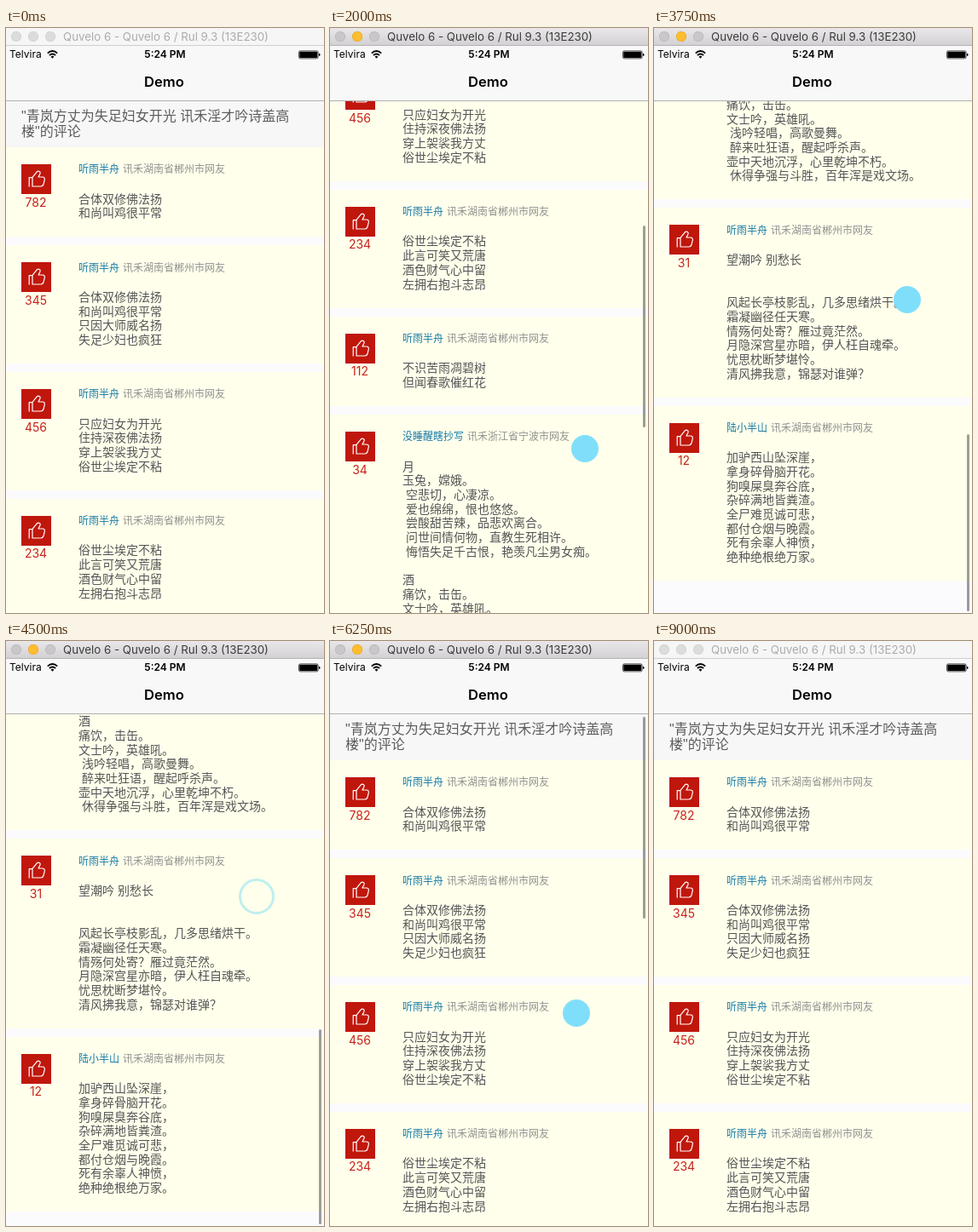
An HTML page that plays this animation: 373x687 px, repeating every 9500 ms.

```html
<!DOCTYPE html>
<html lang="zh-CN">
<head>
<meta charset="utf-8">
<title>Demo</title>
<style>
  html, body { margin: 0; width: 100%; height: 100%; overflow: hidden; background: #fbfbfd; }
  #stage { position: relative; width: 373px; height: 687px; overflow: hidden; background: #fbfbfd;
    font-family: "Liberation Sans", "Noto Sans CJK SC", "Noto Sans CJK", sans-serif; }
  #stage div, #stage svg { position: absolute; }
  #list { left: 0; top: 0; width: 373px; will-change: transform; }
  .head { top: 86px; width: 373px; height: 54px; background: #f7f7f7; }
  .head div { left: 18px; top: 8.8px; font-size: 16px; line-height: 18.5px; color: #5c5c5c; white-space: pre; }
  .card { width: 373px; background: #ffffeb; }
  .like { left: 18px; top: 20px; width: 35px; height: 35px; background: #c0170c; }
  .count { left: 0; top: 56.6px; width: 70px; text-align: center; color: #c8221a;
    font: 14px/16px Inter, sans-serif; }
  .who { left: 85px; top: 18.2px; font-size: 12px; line-height: 16px; white-space: nowrap; color: #929290; }
  .who b { font-weight: 400; color: #1478a6; margin-right: 4px; }
  .text { left: 85px; top: 52.6px; font-size: 14px; line-height: 16.7px; white-space: pre; color: #555; }
  #bar { left: 367px; width: 3px; border-radius: 2px; background: rgba(0, 0, 0, .38); }
  #touch { box-sizing: border-box; border-radius: 50%; }
  #nav { left: 0; top: 21px; width: 373px; height: 64px; background: #f8f8f8; border-bottom: 1px solid #b0b0ae;
    font-family: Inter, sans-serif; color: #000; }
  #nav div { white-space: nowrap; line-height: 16px; }
  #win { left: 0; top: 0; width: 373px; height: 20px; background: #f6f6f6; border-bottom: 1px solid #cfcfcf;
    color: #aeaaae; }
  #win.on { background: linear-gradient(#e9e7e9, #d3d1d3); border-color: #b4b2b4; color: #3c3c3c; }
  #win i { position: absolute; top: 4px; width: 12px; height: 12px; border-radius: 50%; background: #dcdcdc;
    box-shadow: inset 0 0 0 .5px #cacaca; }
  #win.on i { background: #c9c7c9; box-shadow: inset 0 0 0 .5px #b3b1b3; }
  #win.on i.min { background: #fdbd2f; box-shadow: inset 0 0 0 .5px #dfa023; }
  #win div { left: 67px; top: 2px; font: 13.3px/16px Inter, sans-serif; white-space: nowrap; }
</style>
</head>
<body>
<div id="stage">
  <div id="list"><div class="head"><div>"青岚方丈为失足妇女开光 讯禾淫才吟诗盖高
楼"的评论</div></div></div>
  <div id="bar"></div>
  <div id="nav">
    <div style="left:4px;top:2px;font-size:12px">Telvira</div>
    <svg style="left:48px;top:5px" width="13" height="10" fill="none" stroke="#000" stroke-width="1.9">
      <path d="M.8 3.6Q6.5-1.4 12.2 3.6M2.9 6Q6.5 2.9 10.1 6"/>
      <path d="M4.6 7.7Q6.5 6 8.4 7.7L6.5 9.8Z" fill="#000" stroke="none"/>
    </svg>
    <div style="left:0;width:373px;top:2px;text-align:center;font-size:12px;font-weight:600">5:24 PM</div>
    <svg style="left:343px;top:5px" width="27" height="11">
      <rect x=".5" y=".9" width="22.6" height="9" rx="1.6" fill="none" stroke="#000" stroke-width=".7"/>
      <rect x="1.3" y="1.7" width="21" height="7.4" rx=".8"/>
      <path d="M24 3.8q1.6.3 1.6 1.6t-1.6 1.6z"/>
    </svg>
    <div style="left:0;width:371px;top:34px;text-align:center;font-size:16.6px;font-weight:600">Demo</div>
  </div>
  <div id="win">
    <i style="left:6px"></i><i class="min" style="left:26px"></i><i style="left:46px"></i>
    <div>Quvelo 6 - Quvelo 6 / Rul 9.3 (13E230)</div>
  </div>
  <div id="touch"></div>
</div>
<script>
(() => {
  const $ = id => document.getElementById(id);
  const list = $('list'), bar = $('bar'), touch = $('touch'), win = $('win');

  const LOOP = 9500, TICK = 250, MAX = 909;
  const LINE = 16.7, PAD = 72, GAP = 9.95;
  const HUNAN = '讯禾湖南省郴州市网友', ZHEJIANG = '讯禾浙江省宁波市网友';
  const SAIL = '听雨半舟';

  const cards = [
    [782, SAIL, HUNAN, `合体双修佛法扬
和尚叫鸡很平常`],
    [345, SAIL, HUNAN, `合体双修佛法扬
和尚叫鸡很平常
只因大师威名扬
失足少妇也疯狂`],
    [456, SAIL, HUNAN, `只应妇女为开光
住持深夜佛法扬
穿上袈裟我方丈
俗世尘埃定不粘`],
    [234, SAIL, HUNAN, `俗世尘埃定不粘
此言可笑又荒唐
酒色财气心中留
左拥右抱斗志昂`],
    [112, SAIL, HUNAN, `不识苦雨凋碧树
但闻春歌催红花`],
    [34, '没睡醒瞎抄写', ZHEJIANG, `月
玉兔，嫦娥。
 空悲切，心凄凉。
 爱也绵绵，恨也悠悠。
 尝酸甜苦辣，品悲欢离合。
 问世间情何物，直教生死相许。
 悔悟失足千古恨，艳羡凡尘男女痴。

酒
痛饮，击缶。
文士吟，英雄吼。
 浅吟轻唱，高歌曼舞。
 醉来吐狂语，醒起呼杀声。
壶中天地沉浮，心里乾坤不朽。
 休得争强与斗胜，百年浑是戏文场。`],
    [31, SAIL, HUNAN, `望潮吟 别愁长


风起长亭枝影乱，几多思绪烘干。
霜凝幽径任天寒。
情殇何处寄？雁过竟茫然。
月隐深宫星亦暗，伊人枉自魂牵。
忧思枕断梦堪怜。
清风拂我意，锦瑟对谁弹？`],
    [12, '陆小半山', HUNAN, `加驴西山坠深崖，
拿身碎骨脑开花。
狗嗅屎臭奔谷底，
杂碎满地皆粪渣。
全尸难觅诚可悲，
都付仓烟与晚霞。
死有余辜人神愤，
绝种绝根绝万家。`]
  ];

  const thumb = `<svg width="35" height="35" fill="none" stroke="#fff" stroke-width="1.2" stroke-linejoin="round">
    <path d="M9.2 26.5V15.6h3.6M13 26V15.4L18.3 8.8q1.4-1.2 3-.3 1.3.8.7 2.4L20 15h4.6q3.2.2 2.7 3.2l-1.4 5.6q-.7 2.2-3 2.2z"/></svg>`;

  let cardTop = 140;
  for (const [count, name, place, text] of cards) {
    const height = PAD + LINE * text.split('\n').length;
    list.insertAdjacentHTML('beforeend', `<div class="card" style="top:${cardTop}px;height:${height}px">
      <div class="like">${thumb}</div><div class="count">${count}</div>
      <div class="who"><b>${name}</b>${place}</div><div class="text">${text}</div></div>`);
    cardTop += height + GAP;
  }

  // [tick, scroll]
  const scrollKeys = [[0, 0], [4, 0], [5, 3], [6, 80], [7, 220], [8, 363], [10, 600], [12, 844], [13, 900],
    [15, 938], [16, 944], [17, 932], [18, 917], [19, 909], [20, 730], [22, 261], [23, 140], [24, 55],
    [25, 0], [26, -22], [27, -10], [28, -3], [29, -0.7], [30, 0]];
  // [tick, x, y]
  const touchKeys = [[1, 302, 655], [5, 300, 638], [8, 299, 494], [12, 301, 342], [17, 295, 304],
    [18, 294, 300], [20, 294, 330], [22, 293, 428], [26, 288, 440], [29, 287, 442]];

  function sample(keys, n, col = 1) {
    const i = keys.findIndex(k => k[0] >= n);
    if (i < 0) return keys[keys.length - 1][col];
    if (i === 0) return keys[0][col];
    const a = keys[i - 1], b = keys[i];
    return a[col] + (b[col] - a[col]) * (n - a[0]) / (b[0] - a[0]);
  }

  function draw(n) {
    const y = sample(scrollKeys, n);
    list.style.transform = `translateY(${-y}px)`;

    const over = Math.max(0, -y, y - MAX);
    const length = 237 - over;
    bar.style.top = (y > MAX ? 684.5 - length : 88.5 + Math.max(0, y) * 0.394) + 'px';
    bar.style.height = length + 'px';
    bar.style.visibility = n >= 5 && n <= 30 ? 'visible' : 'hidden';

    const ring = n === 18, r = ring ? 21 : 16;
    Object.assign(touch.style, {
      left: sample(touchKeys, n, 1) - r + 'px',
      top: sample(touchKeys, n, 2) - r + 'px',
      width: 2 * r + 'px',
      height: 2 * r + 'px',
      border: ring ? '3px solid #bdeff0' : 'none',
      background: ring ? 'none' : 'rgba(116, 220, 252, .92)',
      visibility: n >= 1 && n < 33 ? 'visible' : 'hidden'
    });
    win.className = n >= 1 && n < 36 ? 'on' : '';
  }

  const start = performance.now();
  let last = -1;
  function frame() {
    const n = Math.floor((performance.now() - start) % LOOP / TICK);
    if (n !== last) draw(last = n);
    requestAnimationFrame(frame);
  }
  frame();
})();
</script>
</body>
</html>
```
